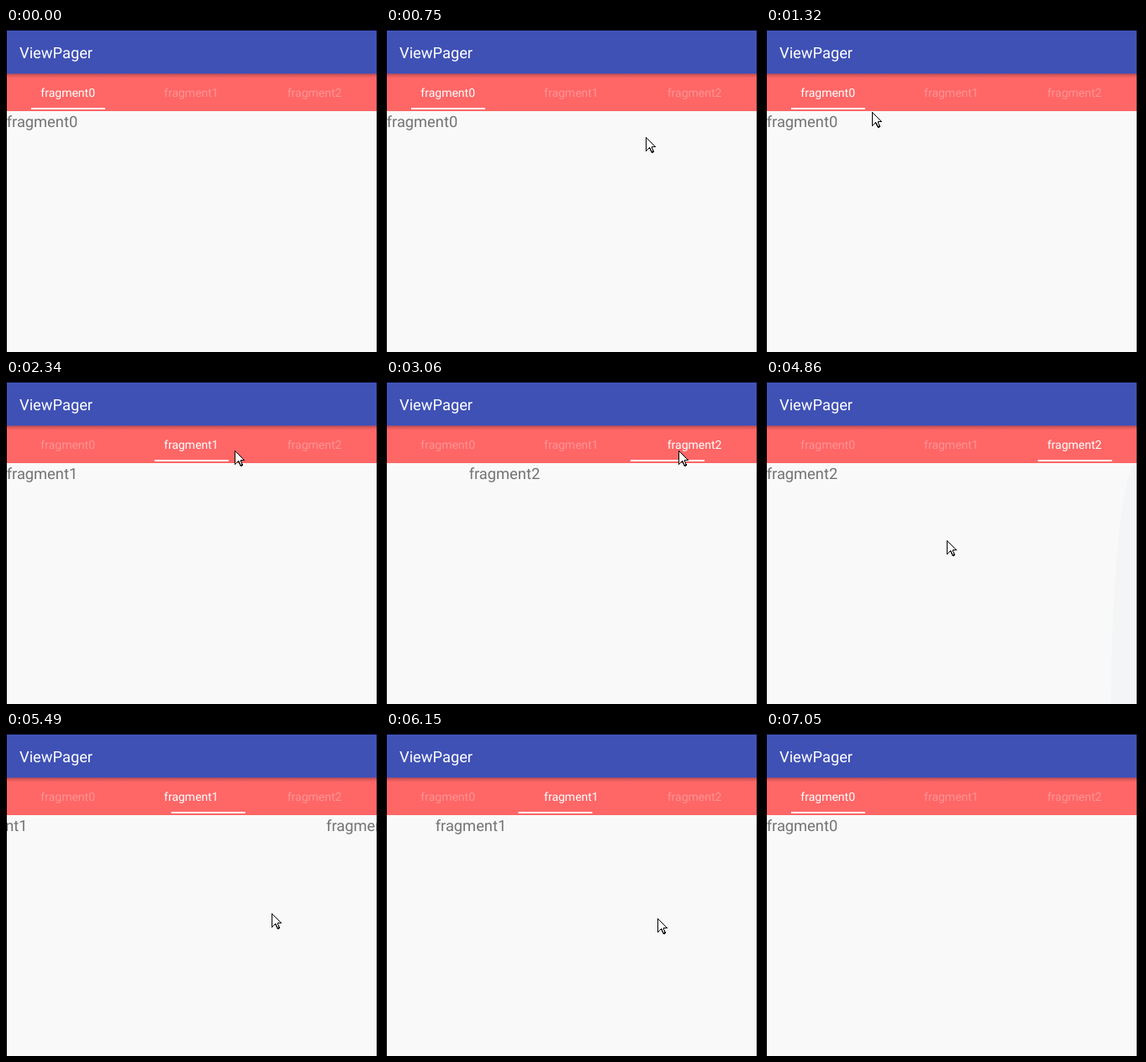
An HTML page for the animation above (7740 ms loop, 445 px wide and 386 px high).

```html
<!DOCTYPE html>
<html lang="en">
<head>
<meta charset="utf-8">
<title>Swiping tabs</title>
<style>
  html, body { margin: 0; width: 100%; height: 100%; overflow: hidden; background: #000; }
  svg { display: block; width: 445px; height: 386px; font-family: Roboto, sans-serif; text-rendering: geometricPrecision; }
  .title { font-size: 18.3px; fill: #fff; }
  .tab { font-size: 14px; fill: #ff9494; text-anchor: middle; }
  .tab.on { fill: #fff; }
  .page { font-size: 18.3px; fill: #737373; }
</style>
</head>
<body>
<svg viewBox="0 0 445 386">
  <defs>
    <linearGradient id="shade" x2="0" y2="1">
      <stop stop-color="#000" stop-opacity=".24"/>
      <stop offset="1" stop-color="#000" stop-opacity="0"/>
    </linearGradient>
    <clipPath id="body"><path d="M1 99H441V386H1Z"/></clipPath>
  </defs>
  <rect width="445" height="386" fill="#000"/>
  <rect x="1" y="99" width="440" height="287" fill="#f9f9f9"/>
  <g clip-path="url(#body)">
    <g id="pages"></g>
    <ellipse id="glow" cx="441" cy="417" rx="31" ry="318" fill="#3f51b5"/>
  </g>
  <rect x="1" y="3" width="440" height="52" fill="#3f51b5"/>
  <rect x="1" y="54.5" width="440" height="44.5" fill="#ff6666"/>
  <rect x="1" y="54.5" width="440" height="5" fill="url(#shade)"/>
  <text class="title" x="16" y="36">ViewPager</text>
  <g id="tabs"></g>
  <rect id="bar" x="30" y="95" width="88" height="2" fill="#fff"/>
  <path id="cursor" d="M.5 .5V16.5L4.5 12.5L7.5 18.5L9.5 17.5L7 12L11.5 11.5Z"
        fill="#fff" stroke="#000" shape-rendering="crispEdges"/>
</svg>
<script>
const LOOP = 7740, STEP = 30, PAGE = 440, TAB = 146.8, SLOP = 10, LAST = 2;
const $ = id => document.getElementById(id);
const clamp = v => Math.min(1, Math.max(0, v));
const settle = p => 1 - (1 - p) ** 5;

// pointer moves: arrival time, duration, x, y; it rests in between
const enter = { time: 420, x: 433, y: 195 }, leave = 7050;
const moves = [
  [1020, 600, 207, 77], [1170, 150, 179, 121], [1320, 150, 126, 100],
  [1560, 120, 207, 69], [2340, 150, 272, 84], [2610, 270, 348, 84],
  [3690, 270, 173, 173], [3840, 150, 55, 191], [4170, 90, 82, 184],
  [4590, 150, 10, 188], [4860, 270, 215, 191], [5130, 270, 235, 200],
  [5400, 180, 330, 215], [5880, 480, 255, 218], [6172, 172, 333, 223],
  [leave, 210, 420, 214]
];

// taps and swipes: press, release, page to settle on, settling time
const gestures = [
  [1882, 1882, 1, 185], [3012, 3012, 2, 185],
  [4440, 4590, 2, 300], [5220, 5400, 1, 300], [6000, 6172, 0, 330]
];

function addText(parent, cls, i, x, y) {
  const el = document.createElementNS("http://www.w3.org/2000/svg", "text");
  el.setAttribute("class", cls);
  el.setAttribute("x", x);
  el.setAttribute("y", y);
  el.textContent = "fragment" + i;
  parent.append(el);
  return el;
}

const tabs = [0, 1, 2].map(i => addText($("tabs"), "tab", i, 73.7 + 146.7 * i, 82));
[0, 1, 2].forEach(i => addText($("pages"), "page", i, .7 + PAGE * i, 118));

function pointerAt(t) {
  let { x, y } = enter;
  for (const [end, dur, toX, toY] of moves) {
    const p = clamp((t - end + dur) / dur);
    x += (toX - x) * p;
    y += (toY - y) * p;
  }
  return { x, y };
}

// page position, and the strength of the glow when pulled past the last page
function scrollAt(t) {
  let pos = 0, glow = 0;
  for (const [down, up, to, dur] of gestures) {
    if (t < down) break;
    const dx = pointerAt(Math.min(t, up)).x - pointerAt(down).x;
    const drag = Math.sign(dx) * Math.max(0, Math.abs(dx) - SLOP);
    const raw = pos - drag / PAGE;
    const held = Math.min(LAST, raw);
    glow = (raw - held) * .8 * (1 - clamp((t - up) / 510)) ** 2;
    pos = held + (to - held) * settle(clamp((t - up) / dur));
  }
  return { pos, glow };
}

function move(el, x, y = 0) {
  el.setAttribute("transform", `translate(${x} ${y})`);
}

function draw(t) {
  const { pos, glow } = scrollAt(t);
  move($("pages"), -PAGE * pos);
  move($("bar"), TAB * pos);
  tabs.forEach((tab, i) => tab.classList.toggle("on", i === Math.round(pos)));
  $("glow").setAttribute("opacity", glow);

  const { x, y } = pointerAt(t);
  move($("cursor"), Math.round(x), Math.round(y));
  $("cursor").style.display = t >= enter.time && t < leave ? "" : "none";
}

const begin = performance.now();
function frame() {
  const t = (performance.now() - begin) % LOOP;
  draw(Math.floor(t / STEP) * STEP);
  requestAnimationFrame(frame);
}
frame();
</script>
</body>
</html>
```
